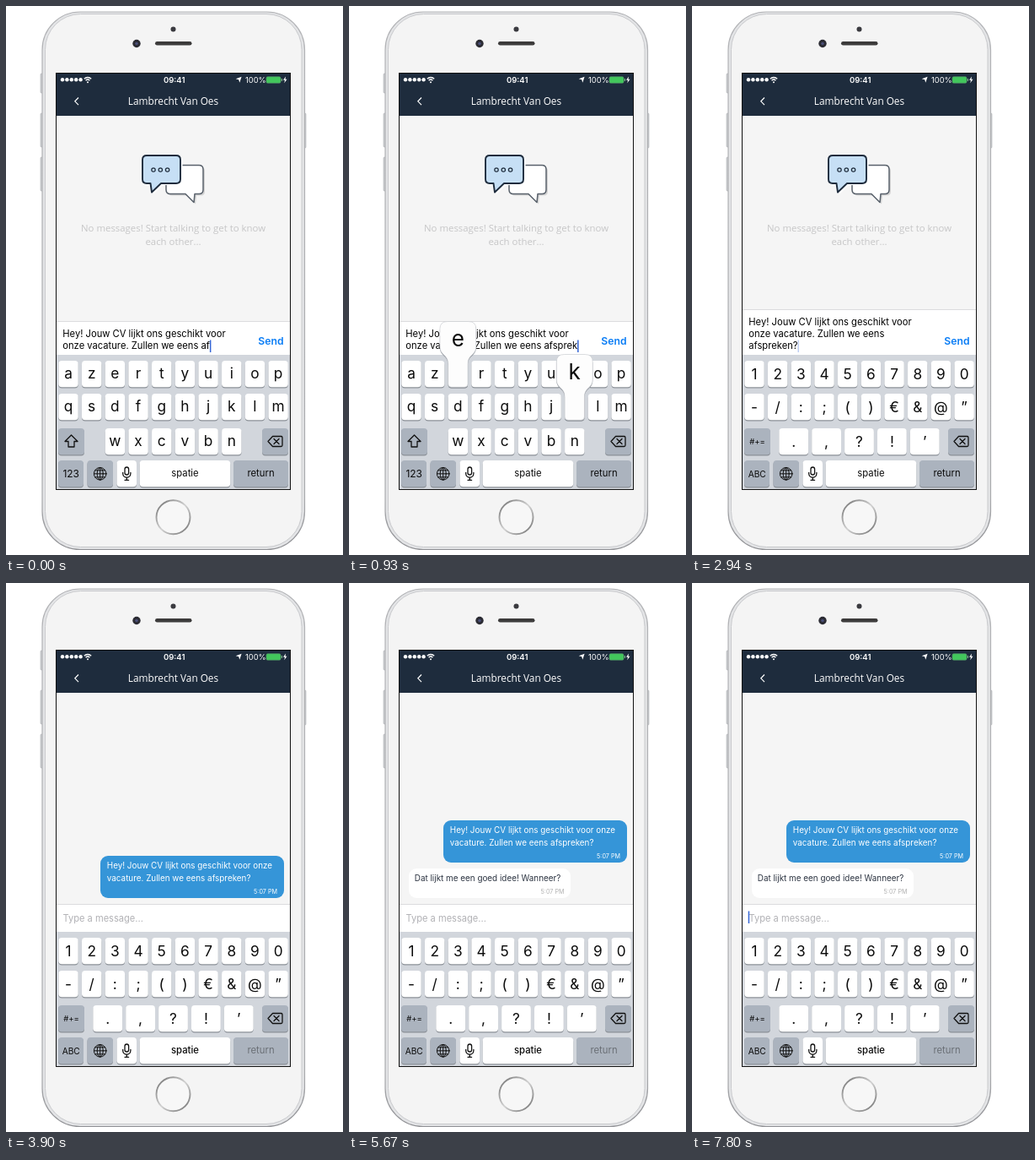
An HTML page that plays this animation: 400 px wide and 650 px high, repeating every 7.86 s.

```html
<!DOCTYPE html>
<html lang="nl">
<head>
<meta charset="utf-8">
<title>Chat</title>
<style>
  html, body { margin: 0; width: 100%; height: 100%; overflow: hidden; background: #fff; }
  svg { display: block; }
  text { font-family: Inter, "Liberation Sans", Arial, sans-serif; white-space: pre; }
  .open { font-family: "Open Sans", "Noto Sans", sans-serif; }
  .mid { text-anchor: middle; }
  .input { font-size: 11.2px; fill: #000; }
  .msg { font-size: 9.9px; }
  .time { font-size: 7.2px; text-anchor: end; }
  .line { fill: none; stroke: #111; stroke-width: 1.3; stroke-linejoin: round; stroke-linecap: round; }
</style>
</head>
<body>
<svg width="400" height="650" viewBox="0 0 400 650">
  <defs>
    <linearGradient id="rim" x1="0" x2="0" y1="0" y2="1">
      <stop offset="0" stop-color="#b2b3b6"/><stop offset=".9" stop-color="#a9aaad"/><stop offset="1" stop-color="#8e8f93"/>
    </linearGradient>
    <linearGradient id="ring" x1="0" x2="1" y1="0" y2="1">
      <stop offset="0" stop-color="#6c6c6c"/><stop offset=".5" stop-color="#d2d2d2"/><stop offset="1" stop-color="#6c6c6c"/>
    </linearGradient>
    <clipPath id="chatClip"><rect id="chatArea" x="60" y="130" width="277" height="250"/></clipPath>
    <clipPath id="inputClip"><rect id="inputArea" x="60" y="373" width="277" height="40"/></clipPath>
  </defs>

  <g fill="#cfd0d3" stroke="#aaabaf" stroke-width=".6">
    <rect x="41" y="80" width="3" height="23" rx="1"/>
    <rect x="41" y="127" width="3" height="40" rx="1"/>
    <rect x="41" y="179" width="3" height="40" rx="1"/>
    <rect x="353" y="127" width="3" height="41" rx="1"/>
  </g>
  <rect x="43" y="7" width="311.500" height="636.500" rx="45" fill="#e3e4e6" stroke="url(#rim)" stroke-width="1.200"/>
  <rect x="46.500" y="9.500" width="304.500" height="631" rx="42" fill="#f4f4f4" stroke="#c9cacd"/>
  <circle cx="198.500" cy="27.500" r="3" fill="#3a3a3f"/>
  <circle cx="155" cy="44.500" r="4.700" fill="#2b2b33"/>
  <circle cx="155" cy="44.500" r="1.800" fill="#4a4f78"/>
  <rect x="177" y="42" width="43.500" height="4.600" rx="2.300" fill="#3c3b3b"/>
  <circle cx="198.500" cy="605.300" r="20" fill="#f7f7f7" stroke="url(#ring)" stroke-width="1.900"/>

  <rect x="59" y="79" width="279" height="494" fill="#111"/>
  <rect x="60" y="130" width="277" height="283" fill="#f5f5f5"/>
  <rect x="60" y="80" width="277" height="50" fill="#1e2c3d"/>

  <g fill="#fff">
    <g id="signal"></g>
    <g fill="none" stroke="#fff" stroke-width="1.300">
      <path d="M92.800 86.200a6 6 0 0 1 8.400 0M94.600 88.200a3.400 3.400 0 0 1 4.800 0"/>
      <path d="M86 108.500l-4.200 4.300 4.200 4.300" stroke-width="1.200"/>
    </g>
    <circle cx="97" cy="90.200" r="1"/>
    <text class="mid" x="199.700" y="91" font-size="9.500" font-weight="600">09:41</text>
    <path d="M279.600 83.800l-2.300 7-1.100-3.500-3.500-1z"/>
    <text x="284" y="90.800" font-size="9.300">100%</text>
    <path d="M332 83.500l-3 4.300h2l-.7 3.500 3.200-4.500h-2z"/>
    <text class="open mid" x="198.500" y="116.800" font-size="11.800">Lambrecht Van Oes</text>
  </g>
  <rect x="309" y="83.800" width="17" height="7.400" rx="1.500" fill="#42c75c" stroke="#5a9b6c" stroke-width=".6"/>
  <rect x="326.800" y="86" width="1.200" height="3" fill="#7bb38a"/>

  <g id="empty">
    <g stroke-linejoin="round">
      <path id="backShade" fill="#d4d4d4" transform="translate(2 2)"/>
      <path id="back" fill="#fff" stroke="#59616b" stroke-width="1.500"/>
      <path id="frontHalo" fill="#fff" transform="translate(2.500 2)"/>
      <path id="front" fill="#c6dff5" stroke="#1e2c3d" stroke-width="1.900"/>
    </g>
    <g fill="none" stroke="#1e2c3d" stroke-width="1.200">
      <circle cx="175" cy="194" r="2.200"/><circle cx="183.300" cy="194" r="2.200"/><circle cx="191.600" cy="194" r="2.200"/>
    </g>
    <g class="mid" fill="#c6c6c7" font-size="11.400">
      <text class="open" x="198.500" y="266.700">No messages! Start talking to get to know</text>
      <text class="open" x="198.500" y="282.700">each other...</text>
    </g>
  </g>

  <g clip-path="url(#chatClip)">
    <g id="sent">
      <rect x="112" y="323" width="218" height="50" rx="9" fill="#3595d8"/>
      <g fill="#fff">
        <text class="msg" x="119.800" y="338.300">Hey! Jouw CV lijkt ons geschikt voor onze</text>
        <text class="msg" x="119.800" y="353">vacature. Zullen we eens afspreken?</text>
        <text class="time" x="322" y="367.700">5:07 PM</text>
      </g>
    </g>
    <g id="reply">
      <rect x="71" y="338" width="192" height="35" rx="9" fill="#fff"/>
      <text class="msg" x="77.800" y="353" fill="#2b3340">Dat lijkt me een goed idee! Wanneer?</text>
      <text class="time" x="255.500" y="367.700" fill="#b0b0b0">5:07 PM</text>
    </g>
  </g>

  <g clip-path="url(#inputClip)">
    <rect x="60" y="350" width="277" height="63" fill="#fff"/>
    <path id="inputEdge" d="M60 .5H337" stroke="#dcdcde"/>
    <g id="lines">
      <text class="input" x="67.300" y="19"></text>
      <text class="input" x="67.300" y="33"></text>
      <text class="input" x="67.300" y="47"></text>
    </g>
    <text id="hint" x="67.500" y="400.500" font-size="11.100" fill="#b1b1b5">Type a message...</text>
    <rect id="caret" width="1.500" height="14.500" fill="#3566d6"/>
    <text id="send" x="299.300" y="401" font-size="12.200" font-weight="600" fill="#0a7df5">Send</text>
  </g>

  <rect x="60" y="413" width="277" height="159" fill="#d2d6dc"/>
  <g id="letters"></g>
  <g id="symbols"></g>
  <g id="common"></g>
  <g id="popups"></g>
</svg>
<script>
const $ = id => document.getElementById(id);
const LOOP = 7860, PITCH = 27.68;
const ROW_Y = [420, 459, 500, 538];
const DARK = '#abb3be';

const clamp = v => Math.min(1, Math.max(0, v));
const ramp = (t, from, to) => clamp((t - from) / (to - from));
const ease = (t, from, to) => 1 - (1 - ramp(t, from, to)) ** 3;
const show = (el, on) => { el.style.display = on ? '' : 'none'; };

// Keyboard
function keyCap(x, y, w, fill = '#fff', id = '') {
  return `<rect x="${x}" y="${y + 1}" width="${w}" height="31.500" rx="4" fill="#8b9097"/>
    <rect ${id && `id="${id}"`} x="${x}" y="${y}" width="${w}" height="31.300" rx="4" fill="${fill}"/>`;
}
const label = (text, x, y, size, extra = '') =>
  `<text class="mid" x="${x}" y="${y}" font-size="${size}" fill="#0b0b0b" ${extra}>${text.replace('&', '&amp;')}</text>`;

function keyRow(chars, row, firstX, pitch, width, drop) {
  return [...chars].map((c, i) => {
    const cx = firstX + i * pitch;
    return keyCap(cx - width / 2, ROW_Y[row], width) + label(c, cx, ROW_Y[row] + drop, 17.3);
  }).join('');
}

const LETTERS = [['azertyuiop', 74], ['qsdfghjklm', 74], ['wxcvbn', 129.4]];
const MARKS = '.,?!’', MARK_X = 120.7, MARK_PITCH = 38.9;

$('letters').innerHTML =
  LETTERS.map(([chars, x], row) => keyRow(chars, row, x, PITCH, 23.4, 21)).join('') +
  keyCap(62, 500, 31, DARK) +
  '<path class="line" d="M77.500 508l7.500 7.500h-4v6.500h-7v-6.500h-4z"/>' +
  keyCap(62, 538, 30, DARK) + label('123', 77.2, 558, 12);

$('symbols').innerHTML =
  keyRow('1234567890', 0, 74, PITCH, 23.4, 22) +
  keyRow('-/:;()€&@”', 1, 74, PITCH, 23.4, 22) +
  keyRow(MARKS, 2, MARK_X, MARK_PITCH, 34.8, 21.5) +
  keyCap(62, 500, 31, DARK) + label('#+=', 77.5, 519, 9.5) +
  keyCap(62, 538, 30, DARK, 'modeKey') + label('ABC', 77.2, 557.5, 10.2);

$('common').innerHTML =
  keyCap(304, 500, 31, DARK) +
  `<path class="line" d="M316.500 509.500h10q1.500 0 1.500 1.500v9q0 1.500-1.500 1.500h-10l-5.500-6z
    M318 512.500l6 6M324 512.500l-6 6"/>` +
  keyCap(96.5, 538, 30.5, DARK) +
  `<g class="line" style="stroke-width:1"><circle cx="111.700" cy="553.800" r="7.300"/>
    <ellipse cx="111.700" cy="553.800" rx="3.500" ry="7.300"/>
    <path d="M111.700 546.500v14.600M104.400 553.800h14.600M105.700 549.800h12M105.700 557.800h12"/></g>` +
  keyCap(131.5, 538, 23.5) +
  `<rect x="141" y="546" width="4.600" height="9" rx="2.300" class="line"/>
    <path class="line" d="M138.700 552.500v1a4.600 4.600 0 0 0 9.200 0v-1M143.300 558.200v3M141 561.300h4.600"/>` +
  keyCap(158.7, 538, 107.5) + label('spatie', 212.5, 557.3, 11.3, 'id="space"') +
  keyCap(270, 538, 65, DARK) + label('return', 302.5, 557.3, 11.3, 'id="return"');

function keyAt(char) {
  const mark = MARKS.indexOf(char);
  if (mark >= 0) return { x: MARK_X + mark * MARK_PITCH, y: ROW_Y[2], half: 17.4 };
  const row = LETTERS.findIndex(([chars]) => chars.includes(char));
  const [chars, first] = LETTERS[row];
  return { x: first + chars.indexOf(char) * PITCH, y: ROW_Y[row], half: 11.7 };
}

function popup(char) {
  const { x, y, half } = keyAt(char);
  const r = half + 9.8, cx = Math.min(x, 336 - r), top = y - 46.5;
  const L = cx - r, R = cx + r, l = x - half, e = x + half;
  const shape = `M${L + 9} ${top}H${R - 9}Q${R} ${top} ${R} ${top + 9}
    V${y - 17}C${R} ${y - 6} ${e} ${y - 8} ${e} ${y + 4}V${y + 27.3}Q${e} ${y + 31.3} ${e - 4} ${y + 31.3}
    H${l + 4}Q${l} ${y + 31.3} ${l} ${y + 27.3}V${y + 4}C${l} ${y - 8} ${L} ${y - 6} ${L} ${y - 17}V${top + 9}Q${L} ${top} ${L + 9} ${top}z`;
  return `<path fill="#8b9097" transform="translate(0 1.200)" d="${shape}"/>
    <path fill="#fdfdfd" stroke="#c3c6cb" stroke-width=".6" d="${shape}"/>
    ${label(char, cx, y - 17.5, 26)}`;
}

// [character, press, insert, release]
const STROKES = [
  ['s', 30, 120, 180], ['p', 360, 450, 510], ['r', 540, 630, 690], ['e', 750, 870, 960],
  ['k', 840, 900, 1020], ['e', 990, 1080, 1140], ['n', 1170, 1260, 1350], ['?', 2460, 2550, 2640],
];
const WRAP = 1260, MODE = 1890, SENT = 3120, REPLY = 5280;

$('popups').innerHTML = STROKES.map(([c]) => `<g>${popup(c)}</g>`).join('');
const popups = [...$('popups').children];
const lines = [...$('lines').children];

$('signal').innerHTML = [0, 1, 2, 3, 4]
  .map(i => `<circle cx="${67 + i * 5.4}" cy="87.300" r="2.200"/>`).join('');

// Speech bubbles in the empty state
const FRONT = 'M167 177h35q5 0 5 5v23q0 5-5 5h-18l-11 10.500-1.500-10.500h-4.500q-5 0-5-5v-23q0-5 5-5z';
const BACK = 'M195 188.500h34q5 0 5 5v24q0 5-5 5h-5l-1 10-10-10h-18q-5 0-5-5v-24q0-5 5-5z';
for (const [id, d] of [['front', FRONT], ['frontHalo', FRONT], ['back', BACK], ['backShade', BACK]])
  $(id).setAttribute('d', d);

function caretAlpha(t) {
  if (t < SENT) return 1 - ramp(t, 2880, 2970);
  const phase = (t - SENT) % 900;
  return phase < 450 ? ramp(phase, -30, 90) : 1 - ramp(phase, 420, 630);
}

function render(t) {
  const sent = t >= SENT, wrapped = t >= WRAP;
  const top = sent ? 359 + 21 * ease(t, SENT, SENT + 270) : 373 - 14 * ease(t, WRAP, WRAP + 180);

  const word = 'af' + STROKES.filter(s => t >= s[2]).map(s => s[0]).join('');
  const body = 'onze vacature. Zullen we eens';
  const copy = ['Hey! Jouw CV lijkt ons geschikt voor',
    ...(wrapped ? [body, word] : [body + ' ' + word, ''])];
  copy.forEach((s, i) => { if (lines[i].textContent !== s) lines[i].textContent = s; });

  $('inputArea').setAttribute('y', top);
  $('inputArea').setAttribute('height', 413 - top);
  $('chatArea').setAttribute('height', top - 130);
  $('inputEdge').setAttribute('transform', `translate(0 ${top})`);
  $('lines').setAttribute('transform', `translate(0 ${top})`);
  show($('lines'), !sent);
  show($('hint'), sent);
  show($('send'), !sent);
  $('send').setAttribute('opacity', t >= 3000 ? 0.35 : 1);

  const last = wrapped ? 2 : 1;
  $('caret').setAttribute('x', sent ? 66.7 : 67.3 + lines[last].getComputedTextLength());
  $('caret').setAttribute('y', sent ? 388.5 : top + 8.5 + 14 * last);
  $('caret').setAttribute('opacity', caretAlpha(t));

  show($('letters'), t < MODE);
  show($('symbols'), t >= MODE);
  $('modeKey').setAttribute('fill', t < MODE + 150 ? '#fff' : DARK);
  $('return').setAttribute('opacity', sent ? 0.4 : 1);
  $('space').setAttribute('font-weight', sent ? 500 : 400);
  STROKES.forEach(([, press, , release], i) => show(popups[i], t >= press && t < release));

  show($('empty'), !sent);
  show($('sent'), sent);
  show($('reply'), t >= REPLY);
  const rise = 57 * (1 - ease(t, SENT, SENT + 360));
  $('sent').setAttribute('transform', `translate(0 ${rise - 42 * ease(t, REPLY, REPLY + 360)})`);
  $('reply').setAttribute('transform', `translate(0 ${42 * (1 - ease(t, REPLY, REPLY + 360))})`);
}

const start = performance.now();
function tick() {
  render((performance.now() - start) % LOOP);
  requestAnimationFrame(tick);
}
tick();
</script>
</body>
</html>
```
